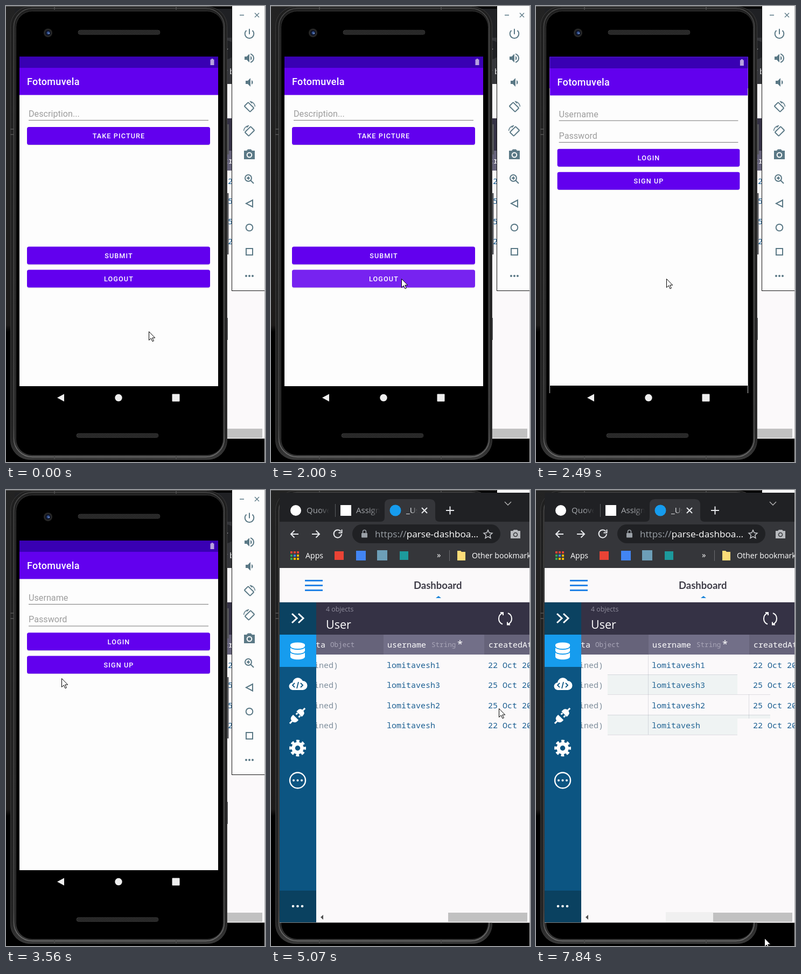
An HTML page that plays this animation: 481x848 px, repeating every 7990 ms.

```html
<!DOCTYPE html>
<html lang="en">
<head>
<meta charset="utf-8">
<title>Logout demo</title>
<style>
  html, body { margin: 0; width: 100%; height: 100%; overflow: hidden; background: #000; }
  svg { display: block; width: 481px; height: 848px; }
  text { white-space: pre; }
  .app { font-family: Roboto, sans-serif; }
  .title { font-weight: 500; font-size: 18px; letter-spacing: .35px; fill: #fff; }
  .hint { font-size: 16.2px; fill: #9d9d9d; }
  .btn { font-weight: 500; font-size: 12.6px; letter-spacing: 1.12px; fill: #fff; text-anchor: middle; }
  .chrome { font-family: "Open Sans", "Noto Sans", sans-serif; }
  .mono { font-family: "Noto Sans Mono", "DejaVu Sans Mono", monospace; font-size: 15px; }
  .cell { fill: #1b5f92; }
  .dim { fill: #7e8e9c; }
  .type { font-size: 12.6px; fill: #a9a6b8; }
  .line { fill: none; stroke-width: 2; }
</style>
</head>
<body>
<svg viewBox="0 0 481 848">
  <defs>
    <linearGradient id="desk" x2="0" y2="1">
      <stop offset="0" stop-color="#232323"/><stop offset=".7" stop-color="#1c1a19"/>
      <stop offset=".715" stop-color="#000"/>
    </linearGradient>
    <linearGradient id="rim" x2="0" y2="1">
      <stop offset="0" stop-color="#1f1f1f"/><stop offset=".95" stop-color="#242424"/>
      <stop offset="1" stop-color="#3a3a3a"/>
    </linearGradient>
    <linearGradient id="edge" x2="0" y2="1">
      <stop offset="0" stop-color="#4c4c4c"/><stop offset=".93" stop-color="#505050"/>
      <stop offset="1" stop-color="#757575"/>
    </linearGradient>
    <linearGradient id="fade"><stop offset="0" stop-color="#202124" stop-opacity="0"/><stop offset="1" stop-color="#202124"/></linearGradient>
    <linearGradient id="fadeOn"><stop offset="0" stop-color="#35363a" stop-opacity="0"/><stop offset="1" stop-color="#35363a"/></linearGradient>
    <pattern id="mesh" width="3" height="3" patternUnits="userSpaceOnUse">
      <rect width="3" height="3" fill="#1c1c1c"/><path d="M0 3L3 0" stroke="#4a4a4a" stroke-width=".8"/>
    </pattern>
    <clipPath id="seenRight"><rect x="374" y="380" width="61" height="45"/></clipPath>
    <clipPath id="seenMain"><rect x="133" y="306" width="241" height="231"/></clipPath>
    <clipPath id="screen"><rect x="25" y="94" width="369" height="613"/></clipPath>

    <g id="grid">
      <path d="M84 343h397v37H84zM84 418h397v37H84z" fill="#64a0aa" fill-opacity=".08"/>
      <path d="M84 343.5h397M84 380.5h397M84 418.5h397M84 455.5h397M208.5 306v149M395.5 306v149" stroke="#50506e" stroke-opacity=".17"/>
    </g>

    <g id="bars">
      <rect x="25" y="94" width="369" height="613" fill="#fdfdfd"/>
      <rect x="25" y="94" width="369" height="21" fill="#3900b3"/>
      <rect x="25" y="115" width="369" height="50.500" fill="#6200ee"/>
      <path d="M379.500 99.500h2v-1.500h3v1.500h2v10.500h-7z" fill="#b7a2df"/>
      <text class="title" x="39" y="147">Fotomuvela</text>
    </g>

    <g id="browser" class="chrome">
      <rect x="16" y="5" width="465" height="799.500" fill="#fbf9fa"/>
      <!-- tabs -->
      <rect x="16" y="5" width="465" height="55" fill="#202124"/>
      <path d="M203 59q8 0 8-8V27q0-10 10-10h74q10 0 10 10v24q0 8 8 8z" fill="#35363a"/>
      <rect x="16" y="59" width="465" height="86" fill="#35363a"/>
      <circle cx="46" cy="38" r="10" fill="#fff"/>
      <rect x="129" y="28" width="20" height="20" fill="#fff"/>
      <circle cx="231" cy="38" r="10.500" fill="#169cee"/>
      <g font-size="15" fill="#a6a9ad">
        <text x="66" y="43">Quovex</text><text x="158" y="43">Assign</text>
        <text x="251" y="43" fill="#e8eaed">_Us</text>
      </g>
      <rect x="90" y="26" width="18" height="24" fill="url(#fade)"/>
      <rect x="108" y="26" width="11" height="24" fill="#202124"/>
      <rect x="184" y="26" width="18" height="24" fill="url(#fade)"/>
      <rect x="202" y="26" width="9" height="24" fill="#202124"/>
      <rect x="260" y="26" width="12" height="24" fill="url(#fadeOn)"/>
      <rect x="272" y="26" width="12" height="24" fill="#35363a"/>
      <path d="M119.500 26v24" stroke="#5a5c60"/>
      <path class="line" d="M280 33l10 10m0-10l-10 10M325 38h15m-7.500-7.500v15" stroke="#e8eaed"/>
      <path class="line" d="M434 22l6 6 6-6" stroke="#bbb" style="stroke-width:1.300"/>
      <!-- address -->
      <rect x="151" y="64" width="275" height="35" rx="17.500" fill="#202124"/>
      <g class="line" stroke="#e8eaed">
        <path d="M51 82H37m6.500-6.500L37 82l6.500 6.500M76 82h14m-6.500-6.500L90 82l-6.500 6.500"/>
        <path d="M129.500 77a7.200 7.200 0 1 0 1.500 5"/><path d="M131.500 73.500v6h-6"/>
        <path d="M403 74.500l2.300 5.100 5.600.6-4.200 3.700 1.200 5.500-4.900-2.800-4.900 2.800 1.200-5.500-4.200-3.700 5.600-.6z" style="stroke-width:1.500" stroke="#c8cace"/>
        <path d="M170.500 80v-2.500a3 3 0 0 1 6 0V80" stroke="#9aa0a6" style="stroke-width:1.500"/>
      </g>
      <rect x="168" y="80" width="11" height="8.500" rx="1" fill="#9aa0a6"/>
      <text x="193" y="88" font-size="17.200" fill="#9aa0a6">https://<tspan fill="#fff">parse-dashboa...</tspan></text>
      <path d="M445 76h4l2-2h6l2 2h4v14h-18z" fill="#b9bbbf"/>
      <circle cx="454" cy="83" r="3.500" fill="none" stroke="#35363a" stroke-width="1.500"/>
      <!-- bookmarks -->
      <path d="M36 114h4v4h-4zM48 114h4v4h-4zM42 114h4v4h-4z" fill="#ea4335"/>
      <path d="M36 120h4v4h-4zM36 126h4v4h-4z" fill="#34a853"/>
      <path d="M42 120h4v4h-4z" fill="#4285f4"/>
      <path d="M48 120h4v4h-4zM42 126h4v4h-4zM48 126h4v4h-4z" fill="#fbbc05"/>
      <rect x="118" y="114" width="17" height="16" fill="#ea4335"/>
      <rect x="158" y="113" width="18" height="18" fill="#4285f4"/>
      <rect x="197" y="112" width="19" height="19" fill="#6d9fb8"/>
      <rect x="239" y="114" width="16" height="16" fill="#1d9a9c"/>
      <path d="M346 113h6l2 2h7v16h-15z" fill="#fddd78"/>
      <path d="M331.500 112v20" stroke="#6a6c70"/>
      <g font-size="14.200" fill="#fff">
        <text x="64" y="127">Apps</text><text x="308" y="126" font-size="15">»</text>
        <text x="373" y="127">Other bookmarks</text>
      </g>
      <!-- page header -->
      <path d="M63 168.500h33m-33 9h33m-33 9h33" stroke="#2484e6" stroke-width="3"/>
      <text x="265" y="184" font-family="Lato, sans-serif" font-weight="700" font-size="18.500" fill="#3f3d48">Dashboard</text>
      <path d="M306 201l5-4 5 4z" fill="#1c84d8"/>
      <rect x="16" y="208" width="465" height="1" fill="#d8d5da"/>
      <rect x="84" y="209" width="397" height="60" fill="#353245"/>
      <text x="102" y="226" font-size="12.300" fill="#8f8d9c">4 objects</text>
      <text x="102" y="258" font-size="21.500" font-weight="500" fill="#fff">User</text>
      <path class="line" d="M430 229a11 11 0 0 0 0 20.500M440 249.500a11 11 0 0 0 0-20.500M426 228h5v5M444 250.500h-5v-5" stroke="#fff"/>
      <!-- table -->
      <rect x="84" y="269" width="397" height="37" fill="#66637a"/>
      <rect x="209" y="269" width="187" height="37" fill="#726f88"/>
      <g class="mono" fill="#fff">
        <text x="101" y="293" text-anchor="end">authData</text><text x="216" y="293">username</text>
        <text x="404" y="293">createdAt</text>
        <text class="type" x="110" y="292">Object</text><text class="type" x="298" y="292">String</text>
        <text x="345" y="294" font-size="20">*</text>
      </g>
      <g class="mono cell">
        <text x="215" y="331">lomitavesh1</text><text x="403" y="331">22 Oct 2021</text>
        <text x="215" y="368">lomitavesh3</text><text x="403" y="368">25 Oct 2021</text>
        <text x="215" y="406">lomitavesh2</text><text x="403" y="406">25 Oct 2021</text>
        <text x="215" y="443">lomitavesh</text><text x="403" y="443">22 Oct 2021</text>
      </g>
      <g class="mono dim" text-anchor="end">
        <text x="125" y="331">(undefined)</text><text x="125" y="368">(undefined)</text>
        <text x="125" y="406">(undefined)</text><text x="125" y="443">(undefined)</text>
      </g>
      <!-- sidebar -->
      <rect x="16" y="209" width="68" height="595" fill="#0c5582"/>
      <rect x="16" y="209" width="68" height="60" fill="#0b4261"/>
      <rect x="16" y="269" width="68" height="60" fill="#169cee"/>
      <rect x="16" y="745" width="68" height="59" fill="#0a4160"/>
      <path class="line" d="M39 230l9 8.500-9 8.500m12-17l9 8.500-9 8.500" stroke="#fff" style="stroke-width:3"/>
      <g fill="#fff">
        <path d="M36 288v22c0 7 27 7 27 0v-22z"/><ellipse cx="49.500" cy="288" rx="13.500" ry="4.500"/>
        <path d="M41 372a7 7 0 0 1-1-14 10 10 0 0 1 19-3 8.500 8.500 0 0 1 0 17z"/>
        <g transform="translate(49 420) rotate(45)">
          <path d="M-7-4.500h14v-3q0-7-7-7t-7 7zM-7 4h14v3q0 7-7 7t-7-7z"/>
          <path d="M0-20v7M0 13v7M-3.500-4v4M3.500-4v4" stroke="#fff" stroke-width="3"/>
        </g>
        <circle cx="42" cy="540" r="2"/><circle cx="49.500" cy="540" r="2"/><circle cx="57" cy="540" r="2"/>
        <circle cx="41" cy="774" r="2.300"/><circle cx="49.500" cy="774" r="2.300"/><circle cx="58" cy="774" r="2.300"/>
      </g>
      <path d="M36 291c0 7 27 7 27 0M36 300c0 7 27 7 27 0" fill="none" stroke="#169cee" stroke-width="1.800"/>
      <path d="M44 359l-4 4 4 4m11-8l4 4-4 4m-4-10l-3 12" fill="none" stroke="#0c5582" stroke-width="1.800"/>
      <g fill="none" stroke="#fff">
        <circle cx="49.500" cy="480" r="8" stroke-width="6.500"/>
        <circle cx="49.500" cy="480" r="12.700" stroke-width="5.500" stroke-dasharray="5.500 4.475" stroke-dashoffset="2.750"/>
        <circle cx="49.500" cy="540" r="14.500" stroke-width="2.400"/>
      </g>
      <!-- scrollbar -->
      <path d="M97 790v9l-5-4.500z" fill="#505050"/>
      <rect x="329" y="786" width="147" height="17" fill="#c1c1c1"/>
    </g>
  </defs>

  <rect width="481" height="848"/>
  <rect width="60" height="848" fill="url(#desk)"/>
  <use href="#browser"/>

  <!-- phone -->
  <path d="M409 220h5v56h-5zM409 348h4.500v114h-4.500zM409 580h3v41h-3z" fill="#55565a"/>
  <rect x="8.500" y="1.500" width="402" height="842" rx="36" fill="url(#rim)" stroke="#3c3c3c"/>
  <rect x="14.500" y="4.500" width="391" height="834" rx="34" fill="none" stroke="url(#edge)" stroke-width="1.500"/>
  <rect x="18.500" y="9.500" width="385" height="826" rx="30" fill="#000" stroke="#363636"/>
  <path d="M8 229h6m-6 10h6M316 2v5M316 837v6M90 2v5M90 837v6" stroke="#4a4a4a" stroke-width="2"/>
  <rect x="134" y="45" width="152" height="8" rx="4" fill="url(#mesh)" stroke="#333"/>
  <rect x="131" y="795" width="152" height="7.500" rx="3.700" fill="url(#mesh)" stroke="#333"/>
  <circle cx="78" cy="50" r="8" fill="#262626"/><circle cx="78" cy="50" r="5" fill="#0c1226"/>
  <circle cx="78.500" cy="50" r="2.800" fill="#32508c"/><circle cx="80" cy="51" r="1" fill="#9fb4e6"/>
  <path d="M108 721.500v14L95 728.500z" fill="#eee"/><circle cx="209" cy="728.500" r="6.700" fill="#eee"/>
  <rect x="308.500" y="721.500" width="14" height="14" rx="1" fill="#eee"/>

  <g class="app" clip-path="url(#screen)">
    <g id="compose">
      <use href="#bars"/>
      <text class="hint" x="42" y="206">Description...</text>
      <path d="M42 212.500h334" stroke="#777"/>
      <g fill="#6200ee">
        <path d="M40 258.500h338M40 481h338M40 524h338" stroke="#000" stroke-opacity=".15"/>
        <rect x="39" y="225" width="340" height="33" rx="3.500"/>
        <rect x="39" y="447.500" width="340" height="33" rx="3.500"/>
        <rect id="logout" x="39" y="490.500" width="340" height="33" rx="3.500"/>
      </g>
      <text class="btn" x="209.500" y="246">TAKE PICTURE</text>
      <text class="btn" x="209.500" y="469">SUBMIT</text>
      <text class="btn" x="209.500" y="512">LOGOUT</text>
    </g>
    <g id="login">
      <rect x="25" y="707" width="369" height="43"/>
      <use href="#bars"/>
      <text class="hint" x="42" y="206">Username</text>
      <text class="hint" x="42" y="246">Password</text>
      <path d="M42 212.500h334M42 253h334" stroke="#777"/>
      <path d="M40 298.500h338M40 341.500h338" stroke="#000" stroke-opacity=".15"/>
      <rect x="39" y="265.300" width="340" height="33" rx="3.500" fill="#6200ee"/>
      <rect x="39" y="308.500" width="340" height="33" rx="3.500" fill="#6200ee"/>
      <text class="btn" x="209.500" y="287">LOGIN</text>
      <text class="btn" x="209.500" y="330">SIGN UP</text>
    </g>
  </g>
  <path id="edges" d="M25.500 153v567M393.500 153v567" stroke="#c4c4c4"/>

  <!-- emulator controls -->
  <rect x="419.500" y="-1" width="61" height="530.500" fill="#fdfdfd" stroke="#111"/>
  <rect id="hover" x="420" y="355" width="15" height="57" fill="#efefef"/>
  <g class="line" stroke="#5b7986">
    <path d="M434 17h8m20-4l8 8m0-8l-8 8" style="stroke-width:1.400"/>
    <path d="M446.500 45.500a8.300 8.300 0 1 0 11 0M452 42.500v10"/>
    <g id="turn">
      <rect x="-5" y="-7.500" width="10" height="15" rx="1" transform="translate(451.500 188) rotate(-45)"/>
      <path d="M453 177.500a10.500 10.500 0 0 1 9.500 9.500M453 177l4 4" style="stroke-width:1.600"/>
    </g>
    <use href="#turn" transform="translate(904 45) scale(-1 1)"/>
    <circle cx="450" cy="320" r="6"/><path d="M454.500 324.500l5.500 5.500M447 320h6m-3-3v6"/>
    <path d="M458 361v12.500l-12-6.200z"/><circle cx="452" cy="412" r="6.300"/>
    <rect x="446" y="451" width="12" height="12"/>
  </g>
  <g fill="#5b7986">
    <path transform="translate(440 85)" d="M3 9v6h4l5 5V4L7 9zm13.500 3c0-1.800-1-3.300-2.500-4v8c1.500-.7 2.500-2.200 2.500-4zM14 3.200v2.100c2.900.9 5 3.500 5 6.700s-2.100 5.800-5 6.700v2.100c4-.9 7-4.500 7-8.800s-3-7.900-7-8.800z"/>
    <path transform="translate(440 130)" d="M18.500 12c0-1.800-1-3.300-2.500-4v8c1.500-.7 2.500-2.200 2.500-4zM5 9v6h4l5 5V4L9 9z"/>
    <path d="M442 269h5l2-2.500h6l2 2.500h5v16h-20z"/>
    <circle cx="446" cy="502" r="2"/><circle cx="452" cy="502" r="2"/><circle cx="458" cy="502" r="2"/>
  </g>
  <circle cx="452" cy="277" r="4.300" fill="#5b7986" stroke="#fdfdfd" stroke-width="2"/>

  <g id="front">
    <use href="#browser"/>
    <g id="cellsRight" clip-path="url(#seenRight)"><use href="#grid"/></g>
    <g id="cellsMain" clip-path="url(#seenMain)"><use href="#grid"/></g>
    <rect id="track" x="241" y="785" width="88" height="19" fill="#f0f0f0"/>
  </g>
  <path d="M0 .5h419" stroke="#666"/>
  <path d="M480.500 0v848" stroke="#b4b4b6"/>

  <path id="cursor" d="M.5.5v16l3.800-3.500 2.700 5.800 2.400-1.100-2.700-5.600h5z" fill="#fff" stroke="#000"/>
</svg>
<script>
  const LOOP = 7990;
  const el = id => document.getElementById(id);
  const show = (id, on) => { el(id).style.visibility = on ? 'visible' : 'hidden'; };
  const latest = (steps, t) => steps.findLast(s => s[0] <= t);

  // [start ms, x, y]
  const path = [
    [0, 265, 605], [280, 253, 562], [410, 242, 530], [560, 242, 510], [710, 233, 498], [830, 235, 500], [970, 242, 507],
    [3170, 214, 464], [3290, 193, 432], [3440, 146, 385], [3560, 103, 350], [3680, 170, 340], [3800, 225, 342],
    [3950, 222, 337], [4100, 222, 333], [4220, 222, 330],
    [4590, 262, 342], [4710, 330, 366], [4830, 394, 392], [4950, 423, 406],
    [5190, 374, 381], [5310, 350, 360], [5430, 300, 300], [5550, 240, 260], [5670, 180, 270], [5790, 133, 340],
    [5910, 180, 480], [6030, 230, 518], [6150, 200, 500], [6270, 290, 585], [6390, 377, 512],
    [6540, 350, 610], [6660, 295, 715], [6780, 249, 786],
    [7230, 262, 752], [7350, 300, 730], [7470, 350, 740], [7590, 392, 775], [7720, 416, 810], [7840, 424, 833]
  ];
  const tint = [[0, '#6200ee'], [1230, '#6a10ee'], [1350, '#711aef'], [2000, '#7723f0'], [2120, '#7f2ff1']];
  // [start ms, scale, opacity]
  const enter = [[0, 1, 0], [2370, .95, .85], [2490, .9965, 1], [2640, 1, 1]];

  function draw(now) {
    const t = now % LOOP;
    const [, x, y] = latest(path, t);
    el('cursor').setAttribute('transform', `translate(${x} ${y})`);
    el('logout').setAttribute('fill', latest(tint, t)[1]);

    const [, scale, alpha] = latest(enter, t);
    el('login').setAttribute('transform', `translate(209.5 407) scale(${scale}) translate(-209.5 -407)`);
    el('login').setAttribute('opacity', alpha);
    show('edges', t >= 2490 && t < 2640);

    show('hover', t >= 4950);
    show('front', t >= 5070);
    show('cellsRight', t >= 5190);
    show('cellsMain', t >= 5430);
    show('track', t >= 6780);
    requestAnimationFrame(() => draw(performance.now() - start));
  }
  const start = performance.now();
  draw(0);
</script>
</body>
</html>
```
